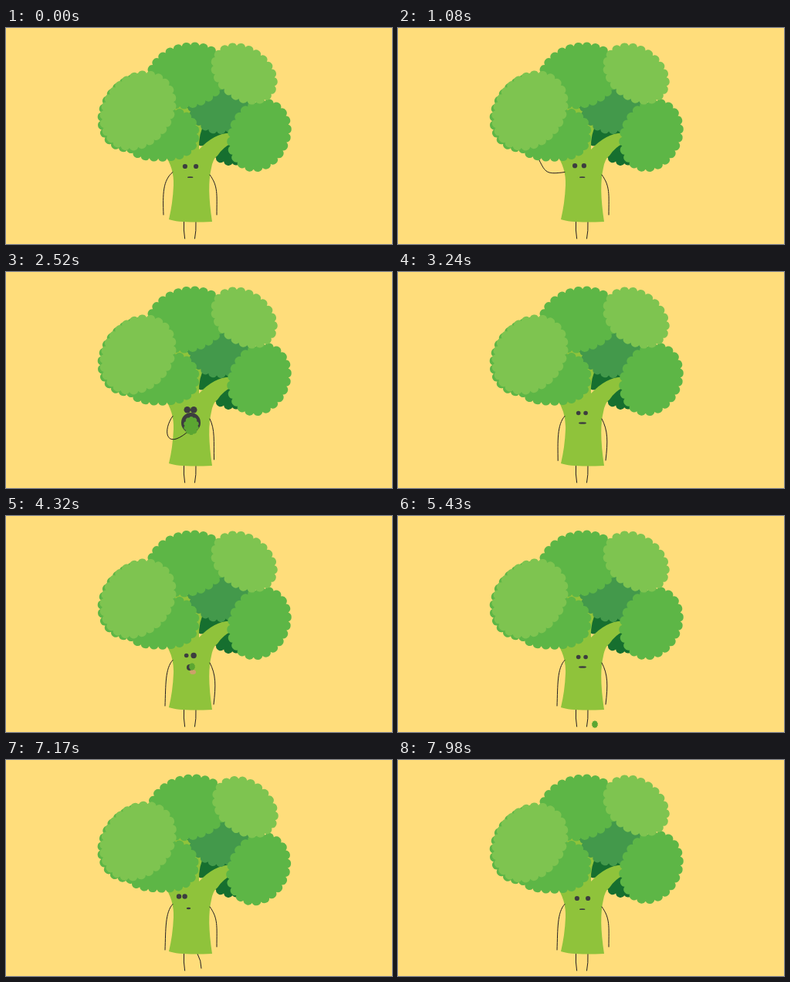
An HTML page for the animation above (8 s loop, 500 by 281 pixels).

```html
<!DOCTYPE html>
<html lang="en">
<head>
<meta charset="utf-8">
<title>Broccoli snack</title>
<style>
  html, body { margin: 0; width: 100%; height: 100%; overflow: hidden; background: #ffdd7b; }
  svg { display: block; width: 100%; height: 100%; }
  .line { fill: none; stroke: #231f20; stroke-linecap: round; }
  .dark { fill: #3d3d3f; }
</style>
</head>
<body>
<svg viewBox="0 0 500 281">
  <g id="back"></g>
  <path class="line" d="M230.5 252Q229.8 263 231.6 274"/>
  <path class="line" id="leg"/>
  <path fill="#8fc33b" d="M205 164Q218 182 217 205Q216 228 211 249Q225 254 267 252Q260 206 266 182Q268 170 274 166Q282 154 293 150V137Q272 135 250 158Q249 138 258 122L234 103L215 98Z"/>
  <path class="line" id="armL"/>
  <path class="line" id="armR"/>
  <circle class="dark" id="eyeL"/>
  <circle class="dark" id="eyeR"/>
  <ellipse class="dark" id="mouth"/>
  <ellipse fill="#cda06a" id="tongue" cx="242" cy="203"/>
  <g id="snack"></g>
  <g id="head"></g>
</svg>
<script>
const $ = id => document.getElementById(id);
const set = (id, attrs) => { for (const k in attrs) $(id).setAttribute(k, attrs[k]); };

function newPath(d) {
  const p = document.createElementNS("http://www.w3.org/2000/svg", "path");
  p.setAttribute("d", d);
  return p;
}

// Scalloped, tilted superellipse; rx and ry reach the tips of the bumps
function floret(parent, color, cx, cy, rx, ry, angle = 0, power = 2, bump = 11.5) {
  const curve = v => Math.sign(v) * Math.abs(v) ** (2 / power);
  const inset = bump * 0.28;
  const ring = Array.from({ length: 120 }, (_, i) => {
    const a = i * Math.PI / 60;
    return [(rx - inset) * curve(Math.cos(a)), (ry - inset) * curve(Math.sin(a))];
  });
  const guide = newPath("M" + ring.join("L") + "Z");
  const length = guide.getTotalLength(), n = Math.round(length / bump);
  const r = length / n * 0.53;
  let d = "";
  for (let i = 0; i <= n; i++) {
    const p = guide.getPointAtLength((i % n) * length / n);
    d += (i ? `A${r} ${r} 0 0 1 ` : "M") + `${p.x} ${p.y}`;
  }
  const shape = newPath(d + "Z");
  shape.setAttribute("fill", color);
  shape.setAttribute("transform", `translate(${cx} ${cy}) rotate(${angle})`);
  $(parent).append(shape);
}

const mid = "#5db646", light = "#7ec450";
floret("back", "#166f2f", 272, 135, 53, 28, 50);
floret("head", "#43994b", 276, 103, 41, 35, 0, 1.8);
floret("head", mid, 235, 62, 55, 42, -15);
floret("head", mid, 328, 139.5, 49, 39.5, -66);
floret("head", light, 308.5, 59.5, 47, 35, 37);
floret("head", mid, 168, 110, 55, 45, -52);
floret("head", mid, 200, 138, 50, 35, 0, 2.6);
floret("head", light, 171, 107.5, 55.5, 45, -52);
floret("snack", "#5ba632", 0, 0, 10, 12.5, 0, 2, 6);

function ramp(t, from, to) {
  const u = Math.min(1, Math.max(0, (t - from) / (to - from)));
  return u * u * (3 - 2 * u);
}
const mix = (a, b, u) => a.map((v, i) => v + (b[i] - v) * u);
// Goes through poses in turn; each move is [from, to, pose]
const moves = (t, start, ...list) =>
  list.reduce((pose, [from, to, next]) => mix(pose, next, ramp(t, from, to)), start);

// Eyes: middle x, y, half gap, radius. Mouth: x, y, rx, ry
const calm = [239, 180, 7.1, 3.1], content = [238.4, 183.5, 4.7, 2.8];
const line = [238.7, 194.2, 3.7, 0.9], flat = [239, 196.5, 5, 1.3];
// Arms: two curve controls and the hand
const hang = [206, 198, 207, 220, 206, 247];
const reach = [192, 191, 191, 188, 183, 172];
const feed = [203, 205, 206, 232, 234, 209];
const rightArm = [275, 206, 273, 216, 273, 243];
const stiff = [271, 205, 269, 220, 269.5, 244];
const stand = [246, 246.5, 264, 244.5, 274];

// Snack position and scale, given the hand that carries it
function snack(t, [x, y]) {
  if (t < 1100 || t > 7140) return [0, 0, 0];
  if (t < 3900) return [x + 6, y - 9, 1 - ramp(t, 2560, 2640)];
  if (t < 4380) return [241, 196, 0.4 * ramp(t, 3980, 4250)];
  const fall = Math.min(1, (t - 4380) / 340);
  const slide = Math.min(1, (t - 4380) / 870);
  const bounce = Math.max(0, t - 4720);
  const hop = 11 * Math.exp(-bounce / 200) * Math.abs(Math.sin(bounce / 75));
  const kick = Math.max(0, (t - 6840) / 300);
  return [241 + 14 * slide + 45 * kick, 196 + 75 * fall ** 2 - hop + 18 * kick, 0.4];
}

// Head tilt in degrees
function tilt(t) {
  if (t < 1620) return 0.9 * Math.sin(Math.PI * t / 270);
  if (t > 5550 && t < 7950) return -1.6 * Math.sin(Math.PI * (t - 5550) / 300);
  return 0;
}

function draw(t) {
  const spit = ramp(t, 4000, 4200) - ramp(t, 4450, 4700);

  const [ex, ey, gap, r] = moves(t, calm,
    [300, 700, [235, 179.2, 5.9, 3.1]], [2000, 2420, [239, 179.3, 4.2, 4.3]],
    [2640, 2900, content], [6600, 7000, [227.8, 177.5, 3.8, 3.2]], [7350, 7800, calm]);
  const eyeY = ey - 2 * spit;
  set("eyeL", { cx: ex - gap, cy: eyeY, r });
  set("eyeR", { cx: ex + gap, cy: eyeY, r: r + 0.9 * spit });

  const [mx, my, rx, ry] = moves(t, line,
    [2200, 2420, [239.5, 196, 12.5, 13]], [2600, 2800, flat],
    [4000, 4200, [238, 197, 4, 4]], [4450, 4700, flat],
    [6600, 7000, [236.5, 193, 2.7, 1.3]], [7350, 7800, line]);
  const chew = t > 2800 && t < 3240 ? Math.sin((t - 2800) / 220 * Math.PI) : 0;
  set("mouth", { cx: mx + chew, cy: my, rx, ry: ry + Math.abs(chew) });
  set("tongue", { rx: 4 * spit, ry: 3 * spit });

  const left = moves(t, [203, 198, 203, 216, 204, 243],
    [300, 1000, reach], [1650, 2350, feed], [2620, 3330, hang]);
  const right = moves(t, rightArm,
    [1640, 1850, [280, 203, 290, 218, 296, 236]], [1850, 2350, stiff],
    [2700, 3200, [272, 206, 272, 220, 269, 245]], [5600, 7000, rightArm]);
  const [hip, ...foot] = moves(t, stand,
    [6300, 6700, [246, 243, 262, 237, 271]], [6700, 6900, [248, 253, 261, 253, 271]],
    [7200, 7600, stand]);
  set("armL", { d: "M216 187.5C" + left });
  set("armR", { d: "M264 191C" + right });
  set("leg", { d: `M${hip} 252Q${foot}` });

  const [x, y, size] = snack(t, left.slice(4));
  set("snack", {
    transform: `translate(${x} ${y}) scale(${size})`,
    visibility: size ? "visible" : "hidden"
  });
  set("head", { transform: `rotate(${tilt(t)} 243 110)` });
}

function loop() {
  draw(performance.now() % 8000);
  requestAnimationFrame(loop);
}
loop();
</script>
</body>
</html>
```
